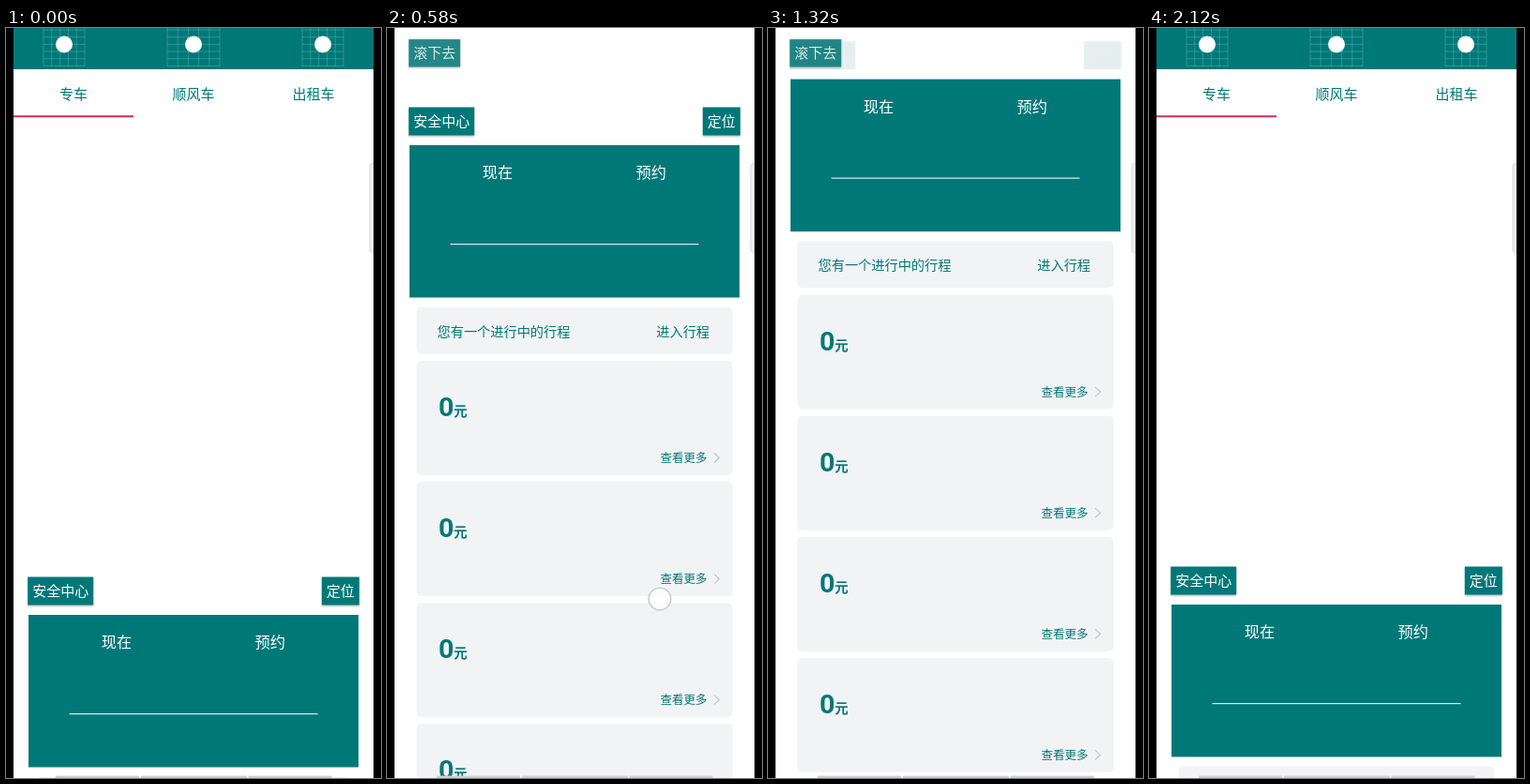
These frames come from a looping animation (400x800 px, 2.14 s). An HTML page with a canvas:

```html
<!DOCTYPE html>
<html lang="zh-CN">
<head>
<meta charset="utf-8">
<title>Ride home</title>
<style>
html, body { margin: 0; width: 100%; height: 100%; overflow: hidden; background: #000; }
canvas { display: block; width: 400px; height: 800px; }
</style>
</head>
<body>
<canvas id="stage"></canvas>
<script>
const W = 400, H = 800, LOOP = 2140, STEP = 20;
const TEAL = '#007878', CARD = '#f2f3f5';
const CJK = '"Noto Sans CJK SC", "Noto Sans CJK", sans-serif';

const canvas = document.getElementById('stage');
const g = canvas.getContext('2d');
const dpr = window.devicePixelRatio || 1;
canvas.width = W * dpr;
canvas.height = H * dpr;

// Panel top over time: [ms, y]
const track = [[0, 626], [180, 471.5], [580, 125], [1140, -44.5],
  [1520, 219.5], [1780, 321.5], [2120, 615], [LOOP, 626]];

// Finger contacts: fade window centre, time of the known position, x, y
const touches = [[116, 180, 289, 665.5], [580, 580, 291, 609],
  [1140, 1140, 286.5, 610.5], [1780, 1780, 296.5, 606.5]];

const clamp = v => Math.max(0, Math.min(1, v));

// Monotone cubic slopes
const slopes = track.map((p, i) => {
  const a = track[i - 1], b = track[i + 1];
  if (!a || !b) return i ? 0.5 : -0.8;
  const d0 = (p[1] - a[1]) / (p[0] - a[0]);
  const d1 = (b[1] - p[1]) / (b[0] - p[0]);
  return d0 * d1 <= 0 ? 0 : 2 * d0 * d1 / (d0 + d1);
});

function panelTop(t) {
  let i = 0;
  while (i < track.length - 2 && t >= track[i + 1][0]) i++;
  const [t0, y0] = track[i], [t1, y1] = track[i + 1];
  const h = t1 - t0, u = (t - t0) / h, v = 1 - u;
  return y0 * v * v * (1 + 2 * u) + y1 * u * u * (3 - 2 * u)
    + h * u * v * (slopes[i] * v - slopes[i + 1] * u);
}

function rect(x, y, w, h, color) {
  g.fillStyle = color;
  g.fillRect(x, y, w, h);
}

function round(x, y, w, h, r, color) {
  g.fillStyle = color;
  g.beginPath();
  g.roundRect(x, y, w, h, r);
  g.fill();
}

// y is the visual middle of the glyphs
function text(s, x, y, size, color, align = 'left', weight = 400) {
  g.font = `${weight} ${size}px ${CJK}`;
  g.textAlign = align;
  g.fillStyle = color;
  g.fillText(s, x, y + size * 0.38);
}

function button(s, x, y, w, h, alpha) {
  g.save();
  g.globalAlpha = alpha;
  g.shadowColor = 'rgba(0,0,0,.25)';
  g.shadowBlur = 2 * dpr;
  g.shadowOffsetY = dpr;
  rect(x, y, w, h, TEAL);
  g.shadowColor = 'transparent';
  text(s, x + w / 2, y + h / 2, 15, '#fff', 'center');
  g.restore();
}

function panel(y) {
  rect(24, y, 352, 162.5, TEAL);
  text('现在', 118, y + 29, 16.2, '#fff', 'center');
  text('预约', 281.8, y + 29, 16.2, '#fff', 'center');
  rect(67.5, y + 105, 265, 1.2, '#d5ecec');
}

function tripRow(y) {
  round(31.5, y, 337, 50, 5, CARD);
  text('您有一个进行中的行程', 53.5, y + 25.5, 14.2, TEAL);
  text('进入行程', 287.3, y + 25.5, 14.2, TEAL);
}

function priceCard(y) {
  round(31.5, y, 337, 122, 5, CARD);
  g.font = '700 28.5px Roboto, sans-serif';
  g.textAlign = 'left';
  g.fillStyle = TEAL;
  g.fillText('0', 55, y + 59);
  text('元', 71.3, y + 53.5, 14.4, TEAL, 'left', 700);
  text('查看更多', 291.6, y + 103.5, 12.5, TEAL);
  g.strokeStyle = '#bfc2c5';
  g.lineWidth = 1.1;
  g.beginPath();
  g.moveTo(349, y + 98.5);
  g.lineTo(354.5, y + 103.5);
  g.lineTo(349, y + 108.5);
  g.stroke();
}

function icon(x, w, cx) {
  g.strokeStyle = 'rgba(255,255,255,.24)';
  g.lineWidth = 0.8;
  g.beginPath();
  for (let i = 0; i <= 5; i++) {
    const gx = x + w * i / 5, gy = 2 + i * 7.7;
    g.moveTo(gx, 0);
    g.lineTo(gx, 41);
    g.moveTo(x, gy);
    g.lineTo(x + w, gy);
  }
  g.stroke();
  g.fillStyle = '#fff';
  g.beginPath();
  g.arc(cx, 17.5, 9, 0, 7);
  g.fill();
}

function header(y) {
  g.save();
  g.translate(0, y);
  rect(8, 0, 384, 44, TEAL);
  icon(40, 44, 62);
  icon(172, 56, 200);
  icon(316, 44, 338);
  rect(8, 44, 384, 52, '#fff');
  ['专车', '顺风车', '出租车'].forEach((s, i) =>
    text(s, 72 + i * 128, 70, 15, TEAL, 'center', 500));
  rect(8, 93.3, 128, 2, '#d02858');
  g.restore();
}

function touch([mid, at, x, y], t) {
  const a = clamp((80 - Math.abs(t - mid)) / 40);
  if (!a) return;
  g.save();
  g.globalAlpha = a;
  g.beginPath();
  g.arc(x, y + panelTop(t) - panelTop(at), 11.8, 0, 7);
  g.fillStyle = 'rgba(255,255,255,.75)';
  g.fill();
  g.strokeStyle = '#c9cdd2';
  g.lineWidth = 1.6;
  g.stroke();
  g.restore();
}

function chrome() {
  g.beginPath();
  g.roundRect(388, 144.5, 10, 95, 3);
  g.fillStyle = '#f0f0f0';
  g.fill();
  g.strokeStyle = '#d6d6d6';
  g.lineWidth = 1;
  g.stroke();
  [[53, 89], [144, 113], [258.5, 89]].forEach(([x, w]) => rect(x, 797.6, w, 2.4, '#cfcfcf'));
  rect(0, 0, 8, H, '#000');
  rect(392, 0, 8, H, '#000');
}

function draw(t) {
  const top = panelTop(t);
  const hidden = clamp((215 - top) / 85);
  const back = t > 1140 ? clamp((t - 1300) / 250) : 1;

  g.setTransform(dpr, 0, 0, dpr, 0, 0);
  rect(0, 0, W, H, '#fff');
  button('安全中心', 23.2, top - 40.5, 70, 30, back);
  button('定位', 336.8, top - 40.5, 40, 30, back);
  panel(top);
  tripRow(top + 172.7);
  for (let y = top + 230; y < H; y += 129.1) priceCard(y);
  if (hidden) button('滚下去', 23.2, 12, 55, 29.5, 0.82 * hidden);
  if (hidden < 1) header(-96 * hidden);
  touches.forEach(p => touch(p, t));
  chrome();
}

const start = performance.now();
function tick() {
  const t = (performance.now() - start) % LOOP;
  draw(Math.floor(t / STEP) * STEP);
  requestAnimationFrame(tick);
}
tick();
</script>
</body>
</html>
```
